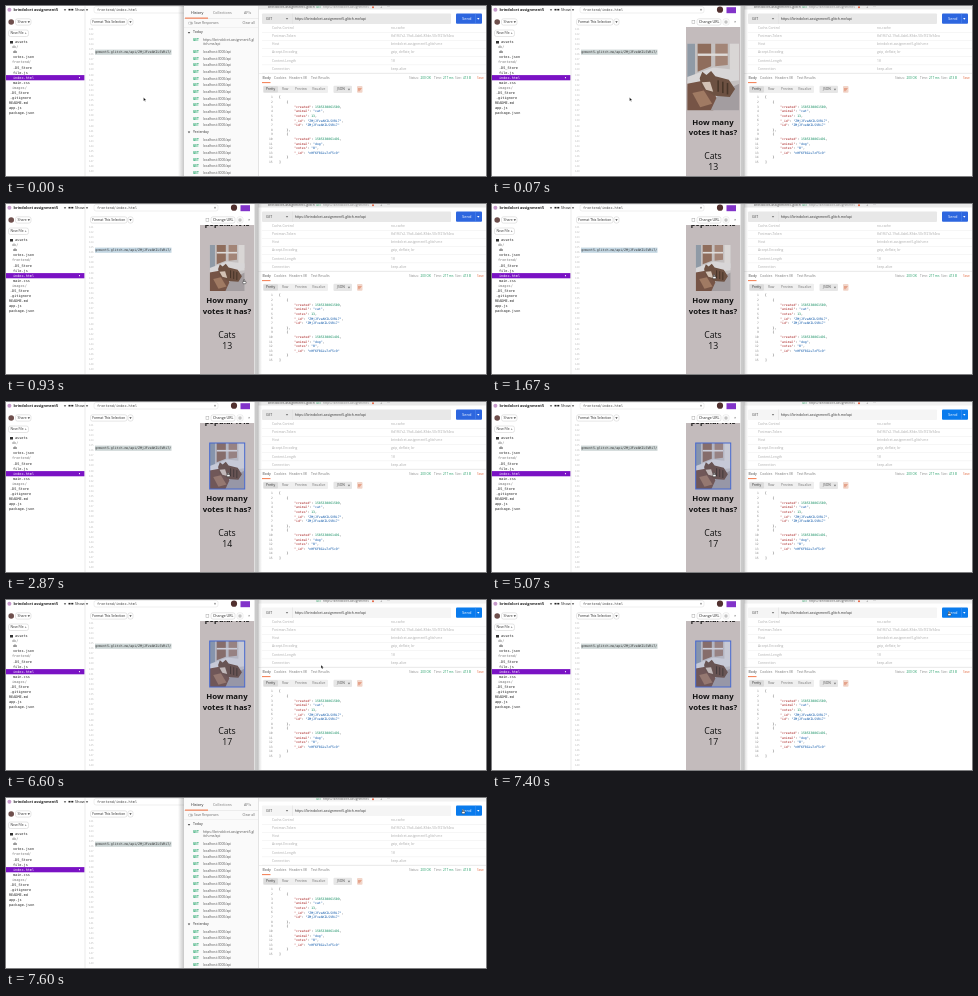
An HTML page with a canvas that plays this animation: 480x170 px, repeating every 8000 ms.

```html
<!DOCTYPE html>
<html lang="en">
<head>
<meta charset="utf-8">
<title>Editor and API client</title>
<style>
html, body { margin: 0; width: 100%; height: 100%; overflow: hidden; background: #fff; }
canvas { display: block; width: 480px; height: 170px; }
</style>
</head>
<body>
<canvas id="stage"></canvas>
<script>
const LOOP = 8000;
const SANS = '"Open Sans", sans-serif';
const MONO = '"DejaVu Sans Mono", monospace';
const HOST = 'brindolcet-assignment5';
const canvas = document.getElementById('stage');
const ctx = canvas.getContext('2d');
const dpr = window.devicePixelRatio || 1;
canvas.width = 480 * dpr;
canvas.height = 170 * dpr;

function rect(x, y, w, h, fill, stroke, lineWidth = 0.5) {
  if (fill) { ctx.fillStyle = fill; ctx.fillRect(x, y, w, h); }
  if (stroke) { ctx.strokeStyle = stroke; ctx.lineWidth = lineWidth; ctx.strokeRect(x, y, w, h); }
}

function pill(x, y, w, h, r, fill, stroke) {
  ctx.beginPath();
  ctx.roundRect(x, y, w, h, r);
  if (fill) { ctx.fillStyle = fill; ctx.fill(); }
  if (stroke) { ctx.strokeStyle = stroke; ctx.lineWidth = 0.5; ctx.stroke(); }
}

function text(s, x, y, size, color = '#333', { bold, mono, center } = {}) {
  ctx.font = `${bold ? 700 : 400} ${size}px ${mono ? MONO : SANS}`;
  ctx.textAlign = center ? 'center' : 'left';
  ctx.textBaseline = 'middle';
  ctx.fillStyle = color;
  ctx.fillText(s, x, y);
}

function dot(x, y, r, color) {
  ctx.fillStyle = color;
  ctx.beginPath();
  ctx.arc(x, y, r, 0, 7);
  ctx.fill();
}

function shape(points, color) {
  ctx.fillStyle = color;
  ctx.beginPath();
  points.forEach(([x, y]) => ctx.lineTo(x, y));
  ctx.closePath();
  ctx.fill();
}

function caret(x, y, color = '#444') {
  shape([[x - 1.2, y - 0.7], [x + 1.2, y - 0.7], [x, y + 1]], color);
}

function shade(x, width, from, to) {
  const g = ctx.createLinearGradient(x, 0, x + width, 0);
  g.addColorStop(0, `rgba(0,0,0,${from})`);
  g.addColorStop(1, `rgba(0,0,0,${to})`);
  rect(x, 0, width, 170, g);
}

const mix = (a, b, p) => a + (b - a) * p;
const ease = p => p * p * (3 - 2 * p);
const phase = (t, from, to) => ease(Math.min(1, Math.max(0, (t - from) / (to - from))));

const FILES = [
  ['assets', 9], ['db/', 6, 1], ['db', 7], ['votes.json', 7], ['frontend/', 6, 1],
  ['.DS_Store', 7], ['file.js', 7], ['index.html', 7], ['main.css', 7], ['images/', 6, 1],
  ['.DS_Store', 4], ['.gitignore', 4], ['README.md', 3], ['app.js', 3], ['package.json', 3]
];

function drawEditor(t) {
  rect(0, 0, 252, 170, '#fff');

  // project bar
  dot(3.4, 3.8, 2, '#c79acb');
  text('brindolcet assignment5', 7.5, 3.7, 3.8, '#222', { bold: true });
  caret(59, 3.9);
  rect(62.5, 2.9, 2, 1.6, '#222');
  rect(65.3, 2.9, 2, 1.6, '#222');
  text('Show', 68.8, 3.7, 4, '#222');
  caret(81, 3.9);
  dot(5.2, 16, 2.8, '#6e4f4c');
  pill(9.5, 12.8, 15.5, 6.3, 2, '#fff', '#ccc');
  text('Share', 11.5, 16, 3.5);
  caret(22.8, 16);
  pill(2.5, 24, 20, 6.5, 2, '#fff', '#ccc');
  text('New File +', 4.5, 27.3, 3.4);

  // file tree
  rect(0, 69.1, 78.5, 5.2, '#7a12c4');
  FILES.forEach(([name, x, folder], i) => {
    const y = 36.3 + i * 5.07;
    const color = i === 7 ? '#fff' : folder ? '#777' : '#222';
    text(name, x, y, 3.5, color, { mono: true });
  });
  rect(4, 35, 3, 2.5, '#333');
  dot(73.5, 71.7, 0.6, '#fff');

  // code pane
  rect(78.7, 0, 0.6, 170, '#ddd');
  pill(88, 0.5, 124, 6.5, 2, '#fff', '#ddd');
  text('frontend/index.html', 91, 3.8, 3.5, '#444', { mono: true });
  dot(209, 3.7, 0.9, '#999');
  pill(84.5, 12.8, 36.5, 6.3, 2, '#fff', '#ccc');
  text('Format This Selection', 86.2, 16, 3.3, '#222');
  pill(122, 12.8, 5, 6.3, 2, '#fff', '#ccc');
  caret(124.5, 16);
  for (let i = 0; i < 30; i++) {
    text(String(121 + i), 83, 23 + i * 5.1, 2.6, '#bbb', { mono: true });
  }
  rect(89, 43.6, 76.5, 5.2, t > 130 && t < 1930 ? '#c3d6e2' : '#ccd5d5');
  text('gnment5.glitch.me/api/ZMjJFveAKILSVRi7/', 89.2, 46.3, 3.24, '#333', { mono: true });

  // toolbar on the right
  dot(228, 3.7, 3.1, '#51302f');
  rect(234.5, 1.2, 9.5, 6, '#8233c9');
  drawPreview(t);
}

function drawPhoto(x, y, w, h) {
  ctx.save();
  ctx.translate(x, y);
  ctx.scale(w, h);
  ctx.beginPath();
  ctx.rect(0, 0, 1, 1);
  ctx.clip();
  // window
  rect(0, 0, 1, 1, '#c4c0c0');
  rect(0, 0, 0.15, 0.55, '#8f9aa6');
  shape([[0.2, 0], [0.46, 0], [0.46, 0.34], [0.2, 0.42]], '#8f6d5c');
  shape([[0.54, 0], [0.78, 0], [0.78, 0.32], [0.54, 0.34]], '#a38577');
  rect(0.2, 0.15, 0.58, 0.035, '#dedbd9');
  rect(0.82, 0, 0.18, 0.5, '#d9d6d5');
  shape([[0, 0.5], [0.5, 0.36], [1, 0.4], [1, 0.55], [0, 0.64]], '#d8d6d7');
  // blankets
  shape([[0, 0.6], [0.35, 0.55], [0.6, 0.85], [0.5, 1], [0, 1]], '#765446');
  shape([[0.1, 0.74], [0.32, 0.7], [0.48, 0.9], [0.25, 0.95]], '#a07a63');
  shape([[0.6, 0.75], [1, 0.6], [1, 1], [0.45, 1]], '#a39da0');
  // cat
  shape([[0.24, 0.52], [0.29, 0.42], [0.37, 0.47], [0.46, 0.41], [0.54, 0.49],
    [0.8, 0.54], [0.92, 0.68], [0.82, 0.8], [0.52, 0.78], [0.28, 0.66]], '#6d5142');
  shape([[0.28, 0.58], [0.44, 0.57], [0.5, 0.72], [0.36, 0.69]], '#d3c2b5');
  for (let i = 0; i < 3; i++) rect(0.58 + i * 0.09, 0.55 + i * 0.02, 0.03, 0.17, '#483529');
  ctx.restore();
}

function voteCount(t) {
  return 13 + [2070, 3070, 4200, 5070].filter(at => t >= at).length;
}

function drawPreview(t) {
  const p = phase(t, 650, 930);
  rect(200, 14.6, 2.8, 2.8, null, '#aaa');
  pill(205, 12.8, 24, 6.3, 2, '#fff', '#ccc');
  text('Change URL', 207, 16, 3.6, '#222');
  pill(231, 12.8, 6, 6.3, 2, '#fff', '#ddd');
  rect(233, 15, 2, 2, null, '#777');
  text('×', 242, 16, 4, '#555');

  ctx.save();
  ctx.beginPath();
  ctx.rect(194, 21, 54.5, 149);
  ctx.clip();
  rect(194, 21, 54.5, 149, '#c3bbbc');
  const head = { bold: true, center: true };
  text('popular it is', 221, mix(15, 20, p), 7.5, '#111', head);
  const w = mix(52, 35, p);
  const h = mix(67, 46, p);
  const x = 221.2 - w / 2;
  const y = mix(37.5, 41, p);
  drawPhoto(x, y, w, h);
  if (t >= 2000) rect(x, y, w, h, 'rgba(70,110,210,0.12)', '#4668cf', 1);
  const lift = -19.3 * p;
  text('How many', 221, 116.6 + lift, 7.8, '#111', head);
  text('votes it has?', 221, 127.2 + lift, 7.8, '#111', head);
  text('Cats', 221, 150.8 + lift, 8.7, '#111', { center: true });
  text(String(voteCount(t)), 221.2, 161.7 + lift, 8.7, '#111', { center: true });
  ctx.restore();
}

const HEADERS = [
  ['Cache-Control', 'no-cache'],
  ['Postman-Token', '8d1f67c2-19a6-4ab6-83de-50c7f21b94ea'],
  ['Host', HOST + '.glitch.me'],
  ['Accept-Encoding', 'gzip, deflate, br'],
  ['Content-Length', '18'],
  ['Connection', 'keep-alive']
];

const JSON_LINES = [
  '[', ' {',
  '  "created": 1585330861509,', '  "animal": "cat",', '  "votes": 13,',
  '  "_id": "ZMjJFveAKILSVRi7",', '  "id": "ZMjJFveAKILSVRi7"', ' },', ' {',
  '  "created": 1585330861491,', '  "animal": "dog",', '  "votes": "0",',
  '  "_id": "nHF6F8Giu7zF5c9"', ' }', ']'
];

function drawJson() {
  JSON_LINES.forEach((line, i) => {
    const y = 91.6 + i * 4.62;
    const body = line.trimStart();
    let x = 273 + (line.length - body.length) * 7.6;
    text(String(i + 1), i < 9 ? 265 : 263, y, 3, '#888', { mono: true });
    body.split(/("[^"]*"(?=:)|"[^"]*"|\d+)/).filter(Boolean).forEach((part, n) => {
      const key = n === 0 && part[0] === '"';
      const color = key ? '#a31515' : part[0] === '"' ? '#0451a5' : /\d/.test(part) ? '#09885a' : '#333';
      text(part, x, y, 3.15, color, { mono: true });
      x += ctx.measureText(part).width;
    });
  });
}

function drawClient(t) {
  const active = t >= 4200;
  const blue = active ? '#097bed' : '#2d66df';
  rect(252, 0, 228, 170, '#fff');
  rect(252, 0, 228, 3.5, active ? '#f2f2f2' : '#e9e9e9');
  rect(251.7, 0, 0.6, 170, '#c9c9c9');
  if (!active) text(HOST + '.glitch', 262, 1.2, 3.4, '#555');
  text('GET', 310, 1.2, 3, '#2a9c61');
  text('https://' + HOST, 317, 1.2, 3.2, active ? '#666' : '#888');
  dot(367, 1.2, 1, '#e4603e');
  text('+', 374, 1.2, 4, '#777');
  text('···', 381, 1.2, 4, '#777');

  pill(256, 7.5, 189, 10.5, 1, active ? '#f5f5f5' : '#e8e8e8');
  text('GET', 260, 12.7, 3.4, '#444');
  caret(281, 12.8, '#777');
  rect(286, 7.5, 0.5, 10.5, '#ddd');
  text(`https://${HOST}.glitch.me/api`, 288.7, 12.7, 3.45, '#333');
  pill(450, 7.6, 26, 10.2, 1, blue);
  text('Send', 456, 12.7, 4, '#fff');
  caret(472.3, 12.8, '#fff');
  rect(469, 7.6, 0.4, 10.2, '#5b95f0');

  HEADERS.forEach(([key, value], i) => {
    const y = 22.3 + i * 8.1;
    rect(256, y + 4, 224, 0.4, '#e9e9e9');
    text(key, 266, y, 3.3, '#aaa');
    text(value, 385, y, 3.3, '#aaa');
  });
  rect(252, 67.3, 228, 0.5, '#ddd');

  text('Body', 256.5, 72.3, 3.5, '#444');
  rect(256, 76.2, 8.5, 0.9, '#f26b3a');
  text('Cookies', 268, 72.3, 3.4, '#777');
  text('Headers (8)', 283, 72.3, 3.4, '#777');
  text('Test Results', 305, 72.3, 3.4, '#777');
  text('Status:', 403, 72.3, 3.1, '#888');
  text('200 OK', 414.5, 72.3, 3.1, '#1b9b62');
  text('Time:', 428, 72.3, 3.1, '#888');
  text('217 ms', 437, 72.3, 3.1, '#1b9b62');
  text('Size:', 449, 72.3, 3.1, '#888');
  text('413 B', 457, 72.3, 3.1, '#1b9b62');
  text('Save', 471, 72.3, 3.1, '#e2683e');

  pill(257, 79.8, 65, 7.2, 1, '#efefef');
  pill(257.5, 80.2, 14.5, 6.4, 1, '#dcdcdc');
  text('Pretty', 260, 83.4, 3.3, '#333');
  text('Raw', 276, 83.4, 3.3, '#777');
  text('Preview', 289, 83.4, 3.3, '#777');
  text('Visualize', 306, 83.4, 3.3, '#777');
  pill(327.5, 79.8, 18.5, 7.2, 1, '#e6e6e6');
  text('JSON', 331, 83.4, 3.3, '#444');
  caret(343, 83.5, '#777');
  pill(351, 80, 5.5, 6.8, 1, '#f1d5c9');
  for (let i = 0; i < 3; i++) rect(352, 82 + i * 1.3, 3.6 - i * 0.7, 0.5, '#d9704c');
  drawJson();
}

function historyRow(label, y) {
  text('GET', 187, y, 3.1, '#20a468', { bold: true });
  text(label, 197, y, 3.3, '#555');
}

function drawHistory() {
  shade(172, 6, 0, 0.22);
  rect(178, 0, 75, 170, '#fafafa');
  rect(252.4, 0, 0.6, 170, '#d5d5d5');
  text('History', 185, 7.5, 3.7, '#222');
  text('Collections', 207, 7.5, 3.7, '#777');
  text('APIs', 238, 7.5, 3.7, '#777');
  rect(178, 12.3, 75, 0.5, '#ddd');
  rect(179, 11.6, 23, 1, '#f26b3a');
  pill(182, 15.8, 4.8, 2.8, 1.4, '#bbb');
  dot(183.5, 17.2, 1, '#fff');
  text('Save Responses', 188, 17.2, 3.3, '#666');
  text('Clear all', 236.5, 17.2, 3.3, '#666');
  rect(178, 21.5, 75, 0.4, '#e4e4e4');
  caret(183, 26.7);
  text('Today', 187, 26.5, 3.5, '#333');
  historyRow('https://' + HOST + '.gl', 34);
  text('itch.me/api', 197, 38.3, 3.3, '#555');
  for (let i = 0; i < 12; i++) historyRow('localhost:3000/api', 46.3 + i * 6.65);
  caret(183, 126.2);
  text('Yesterday', 187, 126, 3.5, '#333');
  for (let i = 0; i < 6; i++) historyRow('localhost:3000/api', 134 + i * 6.6);
}

const PATH = [
  [0, 137.5, 91.5], [530, 137.5, 91.5], [800, 236, 73], [930, 238, 76],
  [1070, 238, 76], [1270, 225, 72], [1600, 225, 72], [1670, 222, 71],
  [5930, 222, 71], [6270, 315, 65], [6600, 315, 65], [7400, 457, 12], [8000, 457, 12]
];

function cursorAt(t) {
  const i = PATH.findIndex(([at]) => at > t);
  const [t0, x0, y0] = PATH[i - 1];
  const [t1, x1, y1] = PATH[i];
  const p = phase(t, t0, t1);
  return [mix(x0, x1, p), mix(y0, y1, p)];
}

function drawCursor(t) {
  const [x, y] = cursorAt(t);
  const overLink = (t > 800 && t < 5950) || t >= 7400;
  ctx.save();
  ctx.translate(x, y);
  if (overLink) {
    pill(-0.5, -0.5, 1.2, 3, 0.6, '#fff', '#222');
    pill(-1.2, 1.4, 3.2, 2.3, 0.7, '#fff', '#222');
  } else {
    shape([[0, 0], [0, 3.6], [0.9, 2.8], [1.5, 4], [2.1, 3.7], [1.6, 2.6], [2.7, 2.6]], '#111');
    ctx.strokeStyle = '#fff';
    ctx.lineWidth = 0.3;
    ctx.stroke();
  }
  ctx.restore();
}

function draw(t) {
  ctx.setTransform(dpr, 0, 0, dpr, 0, 0);
  drawEditor(t);
  drawClient(t);
  if (t < 70 || t >= 7600) {
    drawHistory();
  } else {
    rect(248.5, 0, 1, 170, '#d0d0d0');
    shade(249.5, 6.5, 0.25, 0);
  }
  drawCursor(t);
}

const start = performance.now();
function tick() {
  draw((performance.now() - start) % LOOP);
  requestAnimationFrame(tick);
}
tick();
</script>
</body>
</html>
```
